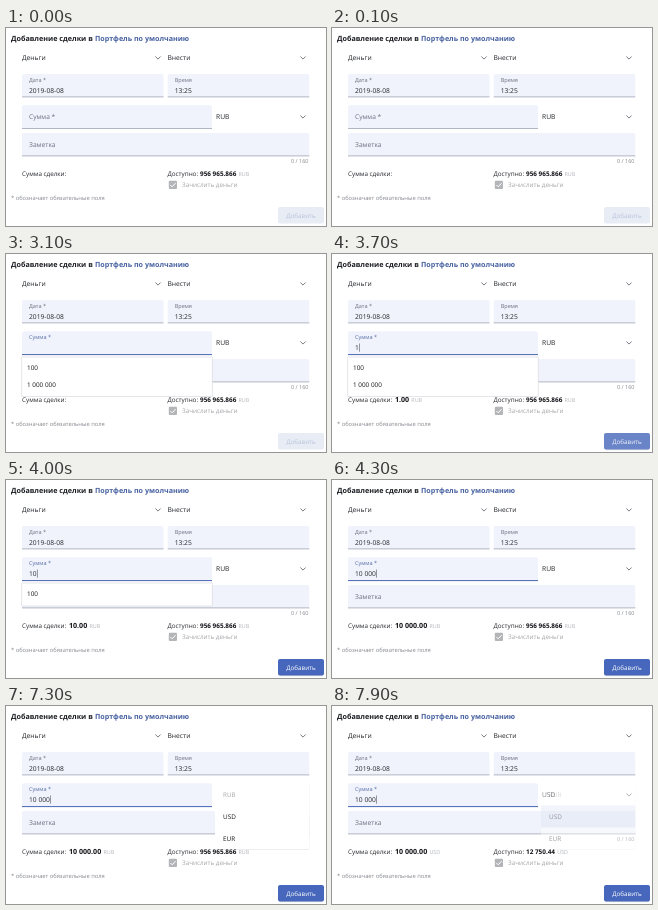
An HTML page for the animation above (8 s loop, 320 by 198 pixels).

```html
<!DOCTYPE html>
<html lang="ru">
<head>
<meta charset="utf-8">
<title>Добавление сделки</title>
<style>
  html, body { margin: 0; width: 100%; height: 100%; overflow: hidden; background: #fff; }
  svg { display: block; width: 100vw; height: 100vh; }
  text { font: 400 6.7px "Open Sans", "Noto Sans", sans-serif; fill: #24262b; white-space: pre; text-rendering: geometricPrecision; }
  .title { font-size: 7.2px; font-weight: 700; fill: #1d1f24; }
  .link { font-size: 7.15px; fill: #4660a0; }
  .label { font-size: 5.55px; fill: #6b7080; }
  .hint { font-size: 5.75px; fill: #85878d; }
  .counter { font-size: 5.5px; fill: #85878d; }
  .body { font-size: 6.3px; }
  .option { font-size: 6.4px; font-weight: 500; fill: #15161a; }
  .strong { font-weight: 700; fill: #121317; }
  .unit { font-size: 5.4px; font-weight: 400; fill: #b3b5ba; }
  .muted { fill: #a5a6aa; }
  .fill { fill: #f0f3fb; }
  .line { fill: #a3a8b4; }
  .chevron { fill: none; stroke: #6a6d75; stroke-width: .9; }
</style>
</head>
<body>
<svg id="stage" viewBox="0 0 320 198"></svg>
<script>
const LOOP = 8000;
const BLUE = '#5672b8';
const stage = document.getElementById('stage');

function add(tag, attrs, parent = stage) {
  const el = document.createElementNS('http://www.w3.org/2000/svg', tag);
  set(el, attrs);
  return parent.appendChild(el);
}
function set(el, attrs) {
  for (const key in attrs) el.setAttribute(key, attrs[key]);
}
function label(x, y, content, cls = '', parent = stage) {
  const el = add('text', { x, y, class: cls }, parent);
  el.textContent = content;
  return el;
}
function rect(x, y, width, height, attrs, parent = stage) {
  return add('rect', { x, y, width, height, ...attrs }, parent);
}
function field(x, y, w, h) {
  add('path', {
    d: `M${x} ${y + h}v${2 - h}q0-2 2-2h${w - 4}q2 0 2 2v${h - 2}z`, class: 'fill'
  });
  rect(x, y + h - .8, w, .8, { class: 'line' });
}
function chevron(x, y) {
  add('path', { d: `M${x - 2.6} ${y - 1.3}l2.6 2.6 2.6-2.6`, class: 'chevron' });
}
// A bold amount followed by its small currency code
function amount(x, y, size) {
  const el = add('text', { x, y, class: 'strong', style: `font-size:${size}px` });
  const value = add('tspan', {}, el);
  const unit = add('tspan', { dx: 2.2, class: 'unit' }, el);
  return (number, code) => {
    value.textContent = number;
    unit.textContent = number && code;
  };
}
const clamp = v => Math.max(0, Math.min(1, v));
const mix = (a, b, p) => a + (b - a) * p;
const mixColor = (a, b, p) => `rgb(${a.map((v, i) => Math.round(mix(v, b[i], p)))})`;
const show = (el, on) => el.setAttribute('visibility', on ? 'visible' : 'hidden');

// Form
rect(0, 0, 320, 198, { fill: '#fff' });
label(5, 12.9, 'Добавление сделки в', 'title');
label(89, 13.3, 'Портфель по умолчанию', 'title link');

label(16, 32.2, 'Деньги');
chevron(152, 29.8);
label(161.5, 32.2, 'Внести');
chevron(297, 29.8);

field(16, 46, 141.5, 23.3);
label(23, 53.8, 'Дата *', 'label');
label(23, 65.2, '2019-08-08');
field(161.7, 46, 141.6, 23.3);
label(168.7, 53.8, 'Время', 'label');
label(168.7, 65.2, '13:25');

field(16, 77.3, 190, 23.7);
const ripple = rect(16, 100, 190, 1.1, { fill: BLUE });
const sumLabel = label(23, 91.3, 'Сумма *', 'label');
const sumValue = label(23, 95.9, '');
const caret = rect(23, 89.5, .6, 8.2, { fill: '#55575e' });
const currency = label(210, 91.2, 'RUB');
chevron(297, 88.8);

field(16, 105, 287.3, 23.3);
const note = label(23, 118.9, 'Заметка');
note.style.fill = '#6b7080';
label(285, 135, '0 / 160', 'counter');

rect(162.8, 152.8, 8.2, 8.2, { rx: 1, fill: '#b4b5b8' });
add('path', { d: 'M164.4 157l1.8 1.8 3.4-3.7', fill: 'none', stroke: '#fff', 'stroke-width': 1 });
label(176, 159.2, 'Зачислить деньги', 'body muted');
label(5, 172.2, '* обозначает обязательные поля', 'hint');

const shadow = rect(272.5, 180.3, 45, 16, { rx: 2, fill: '#000', opacity: .12 });
const button = rect(272, 179, 46, 16.5, { rx: 2 });
const buttonText = label(295, 189.6, 'Добавить', 'body');
buttonText.setAttribute('text-anchor', 'middle');

// Suggestions under the sum
const history = ['100', '1 000 000'];
const popup = add('g', {});
const popupBox = rect(15.8, 103, 190.4, 40, { fill: '#fff', stroke: '#d3d5da', 'stroke-width': .6 }, popup);
const rows = history.map(item => label(21, 0, item, 'option', popup));

// Currency menu
const menu = add('g', {});
rect(209.3, 78, 94.3, 66, { rx: 1.5, fill: '#000', opacity: .07 }, menu);
rect(209, 77, 94.3, 66, { rx: 1.5, fill: '#fff' }, menu);
const hover = rect(209, 99.5, 94.3, 22, { fill: '#dfe5f4' }, menu);
['RUB', 'USD', 'EUR'].forEach((code, i) =>
  label(217, 90.5 + 22 * i, code, i ? 'option' : 'body muted', menu));

// Totals stay readable beneath both popups
label(16, 147.8, 'Сумма сделки:', 'body');
const total = amount(63, 147.8, 7.1);
label(161.5, 147.8, 'Доступно:', 'body');
const available = amount(194, 147.8, 6.4);

const typing = [[3600, '1'], [4000, '10'], [4100, '100'], [4200, '1 000'], [4300, '10 000']];

function caretVisible(t, lastKey) {
  const since = Math.min(t, 7700) - lastKey;
  return t >= 2600 && Math.floor(since / 500) % 2 === 0;
}

function menuOpacity(t) {
  if (t < 6200) return 0;
  if (t < 6300) return .6;
  if (t < 7800) return 1;
  return t < 7900 ? .85 : .42;
}

function render(now) {
  const t = Math.floor(now % LOOP / 100) * 100;
  const focused = t >= 2600;
  const code = t >= 7800 ? 'USD' : 'RUB';
  const [lastKey, typed] = typing.filter(([at]) => at <= t).pop() || [2600, ''];

  const lift = focused ? clamp((t - 2540) / 150) : 0;
  set(sumLabel, { y: mix(91.3, 85.3, lift) });
  sumLabel.style.fontSize = mix(6.6, 5.55, lift) + 'px';
  sumLabel.style.fill = mixColor([107, 112, 128], [86, 108, 170], lift);

  const spread = focused ? 190 * clamp((t - 2504) / 150) : 0;
  set(ripple, { x: 111 - spread / 2, width: spread });

  sumValue.textContent = typed;
  set(caret, { x: 23.3 + (typed ? sumValue.getComputedTextLength() : 0) });
  show(caret, caretVisible(t, lastKey));

  const shown = history.map(item => item.startsWith(typed));
  const count = shown.filter(Boolean).length;
  show(popup, focused && count > 0);
  set(popupBox, { height: 6.5 + 16.5 * count });
  let line = 0;
  rows.forEach((row, i) => {
    row.setAttribute('display', shown[i] ? 'inline' : 'none');
    if (shown[i]) row.setAttribute('y', 116.4 + 16.5 * line++);
  });

  total(typed && typed + '.00', code);
  available(code === 'USD' ? '12 750.44' : '956 965.866', code);
  currency.textContent = code;

  const active = t < 3600 ? 0 : t < 3700 ? .4 : t < 4000 ? .78 : 1;
  button.style.fill = mixColor([232, 236, 245], [70, 103, 187], active);
  buttonText.style.fill = mixColor([185, 195, 219], [255, 255, 255], active);
  show(shadow, active > 0);

  set(menu, { opacity: menuOpacity(t) });
  show(hover, t >= 7800);
}

const start = performance.now();
function tick() {
  render(performance.now() - start);
  requestAnimationFrame(tick);
}
tick();
</script>
</body>
</html>
```
